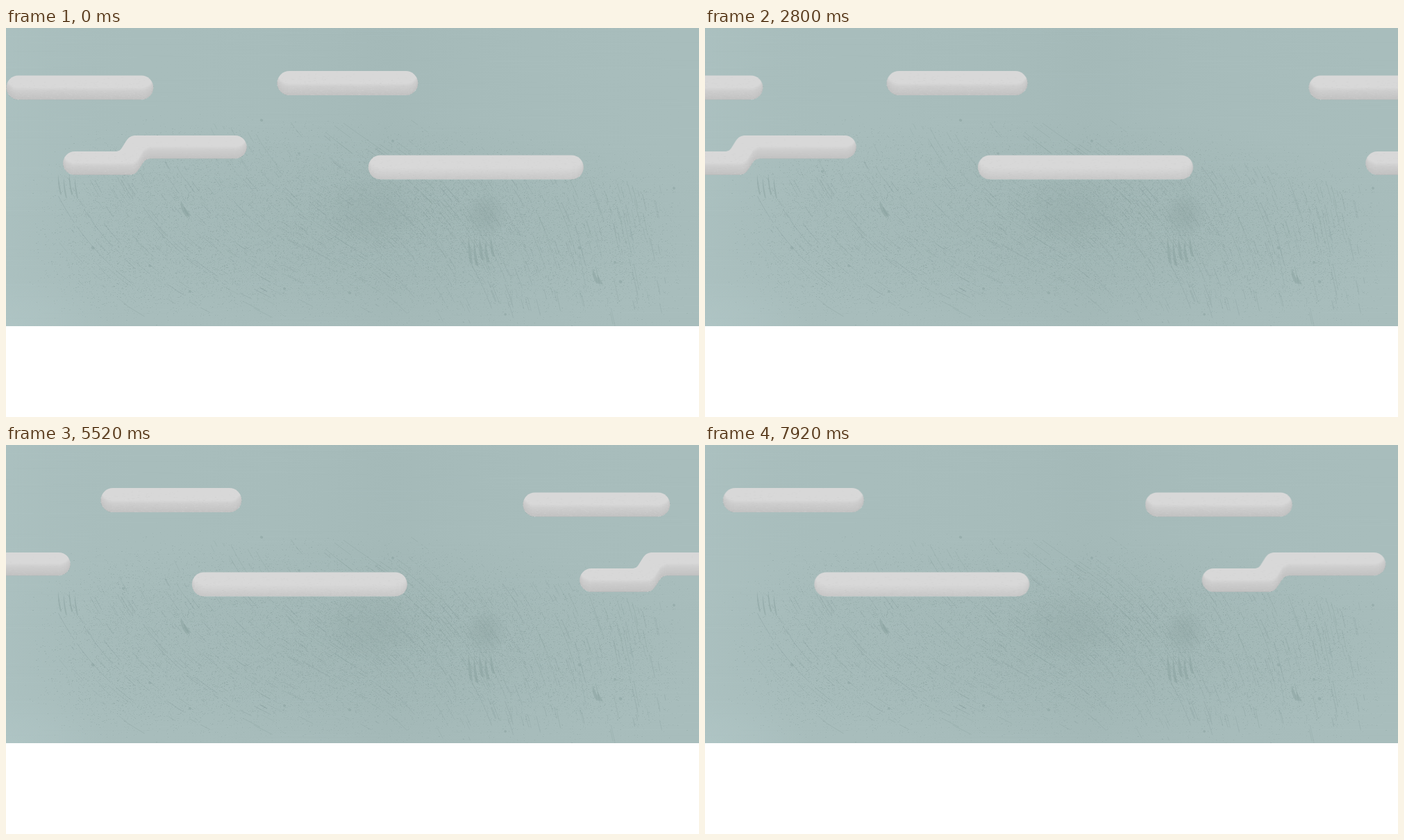
An HTML page with a canvas for the animation above (8000 ms loop, 998 px wide and 561 px high).

```html
<!DOCTYPE html>
<html lang="en">
<head>
<meta charset="utf-8">
<title>Drifting clouds</title>
<style>
  html, body { margin: 0; width: 100%; height: 100%; overflow: hidden; background: #fff; }
  canvas { display: block; }
</style>
</head>
<body>
<canvas id="stage" width="998" height="561"></canvas>
<script>
const W = 998, H = 561, SKY = 430;
const LOOP = 8000, STEP = 80, SPEED = 364.5 / 7920;
const ctx = document.getElementById('stage').getContext('2d');

let seed = 7321;
function rnd() {
  seed = (seed + 0x6D2B79F5) | 0;
  let t = Math.imul(seed ^ (seed >>> 15), 1 | seed);
  t = (t + Math.imul(t ^ (t >>> 7), 61 | t)) ^ t;
  return ((t ^ (t >>> 14)) >>> 0) / 4294967296;
}
const range = (a, b) => a + (b - a) * rnd();
const clamp = (v, a, b) => Math.min(b, Math.max(a, v));
const smooth = (v, a, b) => {
  const k = clamp((v - a) / (b - a), 0, 1);
  return k * k * (3 - 2 * k);
};
const bump = (x, y, cx, cy, rx, ry) =>
  Math.exp(-(((x - cx) / rx) ** 2) - ((y - cy) / ry) ** 2);

function layer(h, paint) {
  const c = document.createElement('canvas');
  c.width = W;
  c.height = h;
  paint(c.getContext('2d'));
  return c;
}

// Direction of the brush marks
function flow(x, y) {
  const left = clamp(75 - 0.15 * (y - 150) - 0.055 * (x - 100), 27, 80);
  const right = clamp(32 + 0.1 * (x - 540) + 0.09 * (y - 160), 35, 78);
  const mid = 440 + Math.max(0, y - 150) * 0.5;
  const k = smooth(x, mid - 70, mid + 70);
  return (left + (right - left) * k) * Math.PI / 180;
}

// How worn the surface is at a point
function wear(x, y) {
  const top = 132 + Math.max(0, x - 600) * 0.15 + Math.max(0, 220 - x) * 0.12;
  const mask = smooth(x, 20, 190) * (1 - smooth(x, 880, 998)) *
    smooth(y, top - 15, top + 115) * (1 - smooth(y, 340, 436));
  return mask * (0.42 + 0.55 * bump(x, y, 545, 265, 115, 60) +
    0.4 * bump(x, y, 690, 275, 55, 60));
}

function trace(g, x, y, len, width, alpha) {
  g.lineWidth = width;
  g.strokeStyle = `rgba(130,153,151,${alpha})`;
  let on = true;
  g.beginPath();
  g.moveTo(x, y);
  for (let s = 0; s < len; s += 3) {
    const a = flow(x, y);
    x += Math.cos(a) * 3;
    y += Math.sin(a) * 3;
    if (rnd() < 0.13) on = !on;
    if (on) g.lineTo(x, y);
    else g.moveTo(x, y);
  }
  g.stroke();
}

function tuft(g, x, y, w, h, lean) {
  g.beginPath();
  g.moveTo(x, y);
  g.quadraticCurveTo(x + w, y + h * 0.5, x + w + lean, y + h);
  g.lineTo(x + lean, y + h * 0.95);
  g.quadraticCurveTo(x - w * 0.4, y + h * 0.5, x, y);
  g.fill();
}

// Soft elliptical wash
function wash(g, x, y, rx, ry, rgb, alpha) {
  g.save();
  g.translate(x, y);
  g.scale(rx, ry);
  const shade = g.createRadialGradient(0, 0, 0, 0, 0, 1);
  shade.addColorStop(0, `rgba(${rgb},${alpha})`);
  shade.addColorStop(0.5, `rgba(${rgb},${alpha * 0.6})`);
  shade.addColorStop(1, `rgba(${rgb},0)`);
  g.fillStyle = shade;
  g.fillRect(-1, -1, 2, 2);
  g.restore();
}

function paintSky(g) {
  g.fillStyle = '#a8bdbc';
  g.fillRect(0, 0, W, SKY);
  const shade = g.createLinearGradient(0, 0, W, 0);
  shade.addColorStop(0, 'rgba(176,198,198,.35)');
  shade.addColorStop(0.2, 'rgba(168,189,188,0)');
  shade.addColorStop(0.55, 'rgba(160,181,180,.45)');
  shade.addColorStop(1, 'rgba(168,189,188,0)');
  g.fillStyle = shade;
  g.fillRect(0, 0, W, SKY);
  wash(g, 0, SKY, 150, 70, '178,200,200', 0.5);
  wash(g, 520, 280, 560, 150, '152,174,172', 0.3);

  // Faint brushed streaks
  for (let i = 0; i < 420; i++) {
    const y = Math.floor(rnd() * SKY), len = range(30, 180);
    g.fillStyle = rnd() < 0.5 ? 'rgba(180,202,200,.08)' : 'rgba(148,172,170,.06)';
    g.fillRect(range(-60, W), y, len, 1);
  }

  // Speckle
  for (let i = 0; i < 110000; i++) {
    const x = Math.floor(range(10, W)), y = Math.floor(range(110, SKY));
    if (rnd() > wear(x, y)) continue;
    g.fillStyle = `rgba(134,157,155,${range(0.12, 0.4)})`;
    g.fillRect(x, y, rnd() < 0.15 ? 2 : 1, 1);
  }

  // Short scratches
  for (let i = 0; i < 1500; i++) {
    const x = range(50, 970), y = range(130, 405);
    if (rnd() > wear(x, y) * 1.1) continue;
    trace(g, x, y, range(8, 40), range(0.5, 1.1), 0.32);
  }

  // Long arcs
  for (let i = 0; i < 11; i++) {
    trace(g, 76 + i * 17 + range(-6, 6), range(215, 300), range(80, 190), 0.9, 0.4);
    trace(g, 225 + i * 20 + range(-8, 8), range(190, 260), range(90, 210), 0.8, 0.38);
    trace(g, 460 + i * 13, range(118, 160) + i * 5, range(80, 230), 0.8, 0.36);
    trace(g, 640 + i * 25, range(217, 315), range(60, 110), 0.8, 0.36);
  }
  for (let i = 0; i < 7; i++) {
    trace(g, 300 + i * 12, 138 + i * 3, range(45, 85), 0.7, 0.34);
    trace(g, 668 + i * 16, range(335, 345), range(50, 80), 0.8, 0.38);
    trace(g, 862 + i * 8, range(216, 241), range(45, 85), 0.8, 0.36);
  }

  // Heavier patches
  wash(g, 690, 270, 32, 34, '140,162,160', 0.4);
  wash(g, 525, 262, 80, 50, '146,168,166', 0.3);
  g.fillStyle = 'rgba(138,161,159,.5)';
  for (let i = 0; i < 5; i++) tuft(g, 666 + i * 8, 302 + (i % 2) * 6, 4, 38 - i * 2.5, 2);
  for (let i = 0; i < 4; i++) tuft(g, 75 + i * 8, 211 + (i % 2) * 5, 2, 30, 3);
  tuft(g, 252, 249, 6, 24, 7);
  tuft(g, 257, 258, 5, 13, 5);
  tuft(g, 845, 347, 5, 22, 5);
  tuft(g, 852, 356, 4, 14, 4);

  const spots = [[368, 133, 2.2], [962, 231, 2], [125, 317, 2.5], [265, 380, 2],
    [495, 382, 2.2], [207, 343, 2], [401, 376, 2], [826, 317, 2.5], [557, 163, 2],
    [885, 366, 2.5], [422, 181, 1.7], [169, 207, 2], [719, 413, 1.8], [877, 338, 2]];
  for (const [x, y, r] of spots) {
    g.beginPath();
    g.ellipse(x, y, r, r * 0.9, 0.4, 0, 7);
    g.fill();
  }
}

function pill(x, y, w, h) {
  const p = new Path2D();
  p.roundRect(x, y, w, h, h / 2);
  return p;
}

// Shading gathers along the lower edge, following the outline
function cloud(g, path, x, y, w, h, low) {
  const depth = 18;
  g.save();
  g.fillStyle = '#d8d8d8';
  g.fill(path);
  g.clip(path);
  g.fillStyle = `rgba(178,175,175,${1 - (1 - low) ** (1 / depth)})`;
  for (let i = 0; i < depth; i++) {
    const rest = new Path2D();
    rest.rect(0, 0, W, 300);
    rest.addPath(path, new DOMMatrix([1, 0, 0, 1, 0, -i]));
    g.fill(rest, 'evenodd');
  }
  for (let i = 0; i < w * 3; i++) {
    const k = Math.sqrt(rnd());
    g.fillStyle = rnd() < 0.5 ? 'rgba(184,182,182,.1)' : 'rgba(222,221,221,.12)';
    g.fillRect(x + Math.floor(rnd() * w), Math.floor(y + k * h), range(1, 3), 1);
  }
  g.restore();
}

function paintClouds(g) {
  cloud(g, pill(0.5, 68.5, 211.7, 34.7), 0, 68, 213, 35, 0.62);
  cloud(g, pill(390.5, 62, 202.8, 35), 390, 62, 204, 35, 0.62);
  cloud(g, pill(521.8, 183.5, 310, 34.8), 521, 183, 311, 35, 0.36);
  const bent = new Path2D(
    'M99 178H157C163 178 165 176 168 171L173 163C177 157 181 155 187 155H330' +
    'A16.6 16.6 0 0 1 330 188.2H209C203 188.2 200 190.5 197 195L191 204' +
    'C187 210 184 211.7 178 211.7H99A16.85 16.85 0 0 1 99 178Z');
  cloud(g, bent, 82, 155, 265, 57, 0.62);
}

const sky = layer(SKY, paintSky);
const clouds = layer(230, paintClouds);

function draw(now) {
  const t = Math.floor((now % LOOP) / STEP) * STEP;
  const shift = t * SPEED;
  ctx.fillStyle = '#fff';
  ctx.fillRect(0, 0, W, H);
  ctx.drawImage(sky, 0, 0);
  ctx.drawImage(clouds, -shift, 0);
  ctx.drawImage(clouds, W - shift, 0);
}

const start = performance.now();
function tick() {
  draw(performance.now() - start);
  requestAnimationFrame(tick);
}
tick();
</script>
</body>
</html>
```
